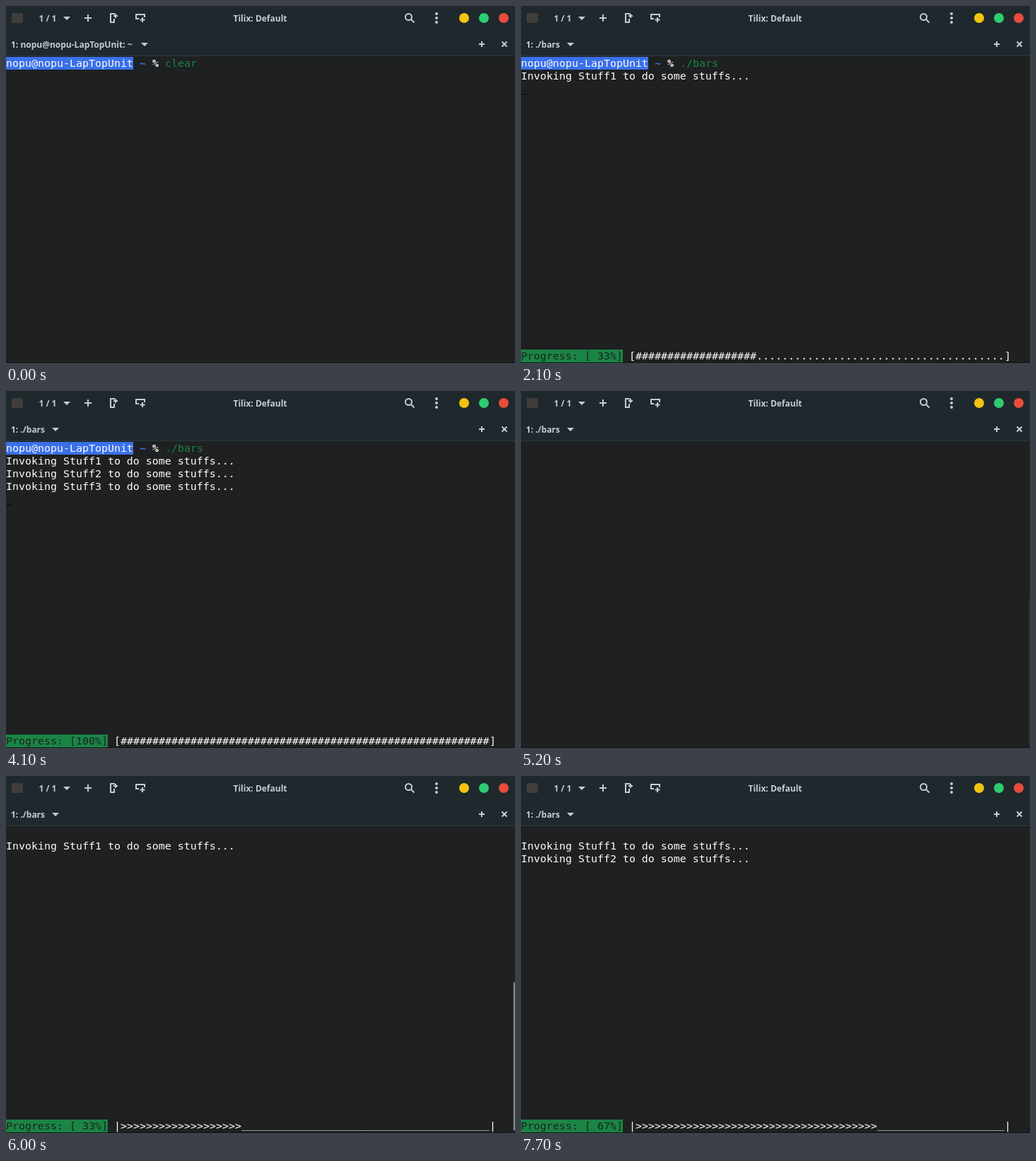
An HTML page that plays this animation: 720x505 px, repeating every 8 s.

```html
<!DOCTYPE html>
<html lang="en">
<head>
<meta charset="utf-8">
<title>Terminal progress bars</title>
<style>
  html, body { margin: 0; width: 100%; height: 100%; overflow: hidden; background: #1e2021; }
  svg { display: block; width: 720px; height: 505px; }
  text { white-space: pre; }
  .ui { font: bold 12px "Noto Sans", sans-serif; fill: #c5cdd0; }
  /* 14.95px gives a 9px wide character cell */
  .term { font: 14.95px "DejaVu Sans Mono", monospace; fill: #fcfcfc; }
  .bold { font-weight: bold; }
  .icon { fill: none; stroke: #c5cdd0; stroke-width: 2; }
  .solid { fill: #c5cdd0; }
</style>
</head>
<body>
<svg viewBox="0 0 720 505">
  <rect width="720" height="505" fill="#1e2021"/>
  <rect width="720" height="70" fill="#1f282d"/>
  <rect y="37" width="720" height="1" fill="#1b2428"/>
  <rect y="70" width="720" height="1" fill="#2c3b3c"/>
  <rect y="504" width="720" height="1" fill="#121415"/>

  <rect x="8" y="10" width="16" height="14" rx="2" fill="#403d3a"/>
  <g class="ui">
    <text x="46.5" y="22">1 / 1</text>
    <text x="359.5" y="22" text-anchor="middle">Tilix: Default</text>
    <text id="tabTitle" x="7" y="59"></text>
  </g>
  <path class="solid" d="M81 15h10l-5 5z"/>
  <path class="solid" id="tabArrow" d="M0 52h10l-5 5z"/>
  <g class="icon">
    <path d="M116 12v10M111 17h10"/>
    <path d="M154 11h-6v12h5v-5M155 11v6M152 14h6"/>
    <path d="M188 18h-4v-6h12v4M193 16v7M189.500 19.500h7"/>
    <circle cx="569.500" cy="15.500" r="4.500"/>
    <path d="M573 19l4.500 4.500"/>
    <path d="M673 50v8M669 54h8M701.500 50.500l7 7M708.500 50.500l-7 7"/>
  </g>
  <g class="solid">
    <circle cx="609" cy="11" r="2"/>
    <circle cx="609" cy="17" r="2"/>
    <circle cx="609" cy="23" r="2"/>
  </g>
  <circle cx="648" cy="17" r="7" fill="#f1c40f"/>
  <circle cx="676" cy="17" r="7" fill="#2ecc71"/>
  <circle cx="704" cy="17" r="7" fill="#e74c3c"/>

  <g id="prompt" class="term">
    <rect y="72" width="180" height="18" fill="#3a70ea"/>
    <text y="86">nopu@nopu-LapTopUnit</text>
    <text class="bold" x="189" y="86" fill="#3a70ea" style="fill:#3a70ea">~</text>
    <text class="bold" x="207" y="86">%</text>
    <text id="command" x="225" y="86" style="fill:#1a8545"></text>
  </g>
  <rect id="cursor" width="9" height="2" fill="#121415"/>
  <g class="term">
    <text class="task" y="104">Invoking Stuff1 to do some stuffs...</text>
    <text class="task" y="122">Invoking Stuff2 to do some stuffs...</text>
    <text class="task" y="140">Invoking Stuff3 to do some stuffs...</text>
  </g>
  <g id="progress" class="term">
    <rect y="486" width="144" height="18" fill="#1a8545"/>
    <text id="percent" y="500" style="fill:#1e2021"></text>
    <text id="open" x="153" y="500"></text>
    <text id="done" x="162" y="500"></text>
    <text id="rest"></text>
    <text id="close" x="684" y="500"></text>
  </g>
  <g id="scrollbar">
    <rect x="717" y="291" width="3" height="211" fill="#343839"/>
    <rect x="718" y="292" width="2" height="209" fill="#858a8b"/>
  </g>
</svg>
<script>
const LOOP = 8000, CELL = 9, BAR_CELLS = 58;
const PERCENTS = [0, 33, 67, 100];
const STYLES = [
  { open: "[", done: "#", rest: ".", close: "]", lift: 0 },
  { open: "|", done: ">", rest: "_", close: "|", lift: 2 }
];
// [start time, value]
const TASKS = [[0, 0], [2100, 1], [3100, 2], [4100, 3], [5200, 0], [6000, 1], [7000, 2]];
const SCROLLBAR = [[0, 0], [5200, .1], [5300, .5], [5400, .9], [5600, 1],
                   [7200, .8], [7300, .5], [7400, .2], [7700, 0]];

const $ = id => document.getElementById(id);
const taskLines = document.querySelectorAll(".task");
const valueAt = (steps, t) => steps.filter(([start]) => start <= t).pop()[1];
const show = (el, on) => el.setAttribute("visibility", on ? "visible" : "hidden");

function drawBar(tasks, style) {
  const percent = PERCENTS[tasks];
  const filled = Math.floor(BAR_CELLS * percent / 100);
  show($("progress"), tasks > 0);
  $("percent").textContent = `Progress: [${String(percent).padStart(3)}%]`;
  $("open").textContent = style.open;
  $("done").textContent = style.done.repeat(filled);
  $("rest").textContent = style.rest.repeat(BAR_CELLS - filled);
  $("rest").setAttribute("x", 162 + filled * CELL);
  $("rest").setAttribute("y", 500 - style.lift);
  $("close").textContent = style.close;
}

function draw(t) {
  const running = t >= 900, secondRun = t >= 5200;
  const tasks = valueAt(TASKS, t);

  $("tabTitle").textContent = running ? "1: ./bars" : "1: nopu@nopu-LapTopUnit: ~";
  $("tabArrow").setAttribute("transform", `translate(${running ? 65 : 191})`);
  $("command").textContent = t < 200 ? "clear" : "./bars";
  show($("prompt"), !secondRun);
  show($("cursor"), running && !secondRun);
  $("cursor").setAttribute("y", 106 + 18 * tasks);
  taskLines.forEach((line, i) => show(line, i < tasks));
  drawBar(tasks, STYLES[+secondRun]);
  $("scrollbar").setAttribute("opacity", valueAt(SCROLLBAR, t));
}

const begin = performance.now();
function tick() {
  draw((performance.now() - begin) % LOOP);
  requestAnimationFrame(tick);
}
tick();
</script>
</body>
</html>
```
